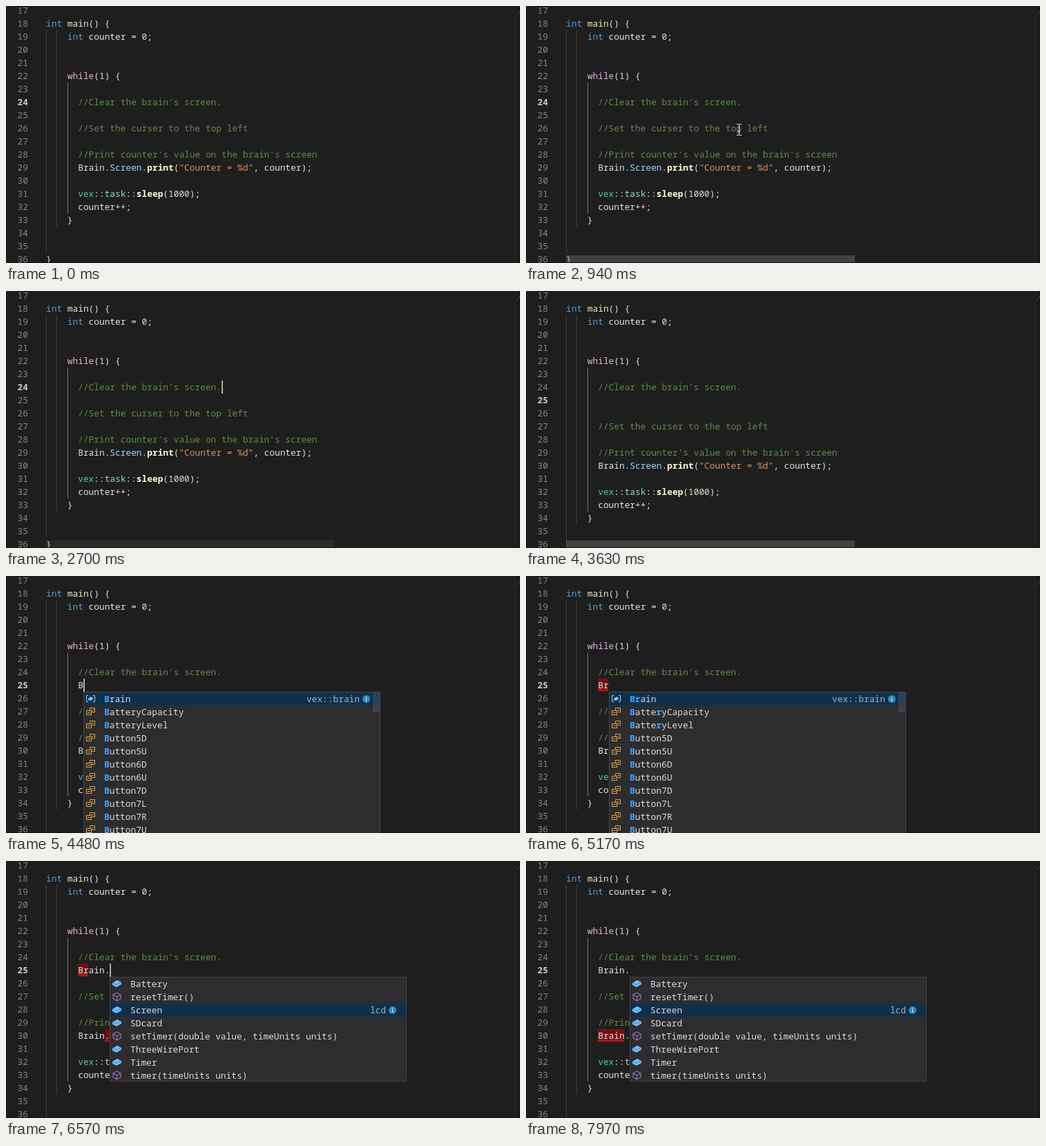
Animation, 744 px wide and 373 px high, one loop 8000 ms. Source, as an HTML page with a canvas:

```html
<!DOCTYPE html>
<html lang="en">
<head>
<meta charset="utf-8">
<title>Code editor</title>
<style>
html, body { margin: 0; width: 100%; height: 100%; overflow: hidden; background: #1e1e1e; }
canvas { display: block; }
</style>
</head>
<body>
<canvas id="stage" width="744" height="373"></canvas>
<script>
const ctx = document.getElementById('stage').getContext('2d');
const LOOP = 8000, CHAR = 7.697, ROW = 19, LEFT = 58;
const FONT = '12.83px "Noto Sans Mono", "DejaVu Sans Mono", monospace';
const PLAIN = '#e4e4e4';

const before = ['', 'int main() {', '    int counter = 0;', '', '', '    while(1) {', '',
  "      //Clear the brain's screen."];
const after = ['', '      //Set the curser to the top left', '',
  "      //Print counter's value on the brain's screen",
  '      Brain.Screen.print("Counter = %d", counter);', '',
  '      vex::task::sleep(1000);', '      counter++;', '    }', '', '', '}'];

const syntax = [
  [/^\/\/.*/, '#608b4e'],
  [/^"[^"]*"/, '#d7936a'],
  [/^int\b/, '#569cd6'],
  [/^while\b/, '#dcb8dc'],
  [/^main\b/, '#ececcc'],
  [/^(print|sleep)\b/, '#ffffdc', true],
  [/^vex\b/, '#4ec9b0'],
  [/^task\b/, '#8fdccb'],
  [/^Screen\b/, '#9cdcfe'],
  [/^\d+/, '#d3e4c8'],
  [/^(\w+|.)/, PLAIN]
];

const globals = ['Brain', 'BatteryCapacity', 'BatteryLevel', 'Button5D', 'Button5U', 'Button6D',
  'Button6U', 'Button7D', 'Button7L', 'Button7R', 'Button7U'];
const members = ['Battery', 'resetTimer()', 'Screen', 'SDcard',
  'setTimer(double value, timeUnits units)', 'ThreeWirePort', 'Timer', 'timer(timeUnits units)'];

// pointer path: [step, x, y], one step is about 77 ms
const path = [[1, 580, 336], [2, 584, 330], [4, 584, 330], [5, 594, 335], [6, 578, 320], [8, 480, 264],
  [10, 365, 205], [12, 308, 179], [13, 305, 170], [15, 324, 142], [18, 324, 132], [21, 324, 132],
  [22, 313, 139], [24, 314, 138], [27, 490, 90], [30, 752, -10]];
const caretOn = [[1710, 2240], [2700, 3630], [4020, 5170], [5640, 6980], [7510, 7970]];
const barAlpha = [[0, 0], [70, .2], [150, .4], [2700, .13], [3160, .4], [4020, .2], [4100, 0]];
const typing = [[0, ''], [4400, 'B'], [4640, 'Br'], [5960, 'Brain'], [6420, 'Brain.']];

const at = (table, t) => table.filter(k => k[0] <= t).pop()[1];
const lineTop = n => 149 + ROW * (n - 25);
const colX = c => LEFT + c * CHAR;

function rect(x, y, w, h, color) {
  ctx.fillStyle = color;
  ctx.fillRect(x, y, w, h);
}

function text(str, x, y, color, bold) {
  ctx.font = (bold ? 'bold ' : '') + FONT;
  ctx.fillStyle = color;
  [...str].forEach((ch, i) => ctx.fillText(ch, x + i * CHAR, y));
}

function poly(points, fill, stroke, close = true) {
  ctx.beginPath();
  points.forEach(([x, y]) => ctx.lineTo(x, y));
  if (close) ctx.closePath();
  if (fill) { ctx.fillStyle = fill; ctx.fill(); }
  if (stroke) { ctx.strokeStyle = stroke; ctx.lineWidth = 1; ctx.stroke(); }
}

function codeLine(str, n) {
  let c = 0;
  while (c < str.length) {
    const rest = str.slice(c);
    const rule = syntax.find(s => s[0].test(rest));
    const word = rest.match(rule[0])[0];
    if (word !== ' ') text(word, colX(c), lineTop(n) + 14, rule[1], rule[2]);
    c += word.length;
  }
}

function guide(x, from, to, color) {
  rect(x, lineTop(from), 1, (to - from + 1) * ROW, color);
}

function errorBox(n, col, len) {
  rect(Math.round(colX(col)), lineTop(n), Math.round(len * CHAR), ROW, '#721010');
}

function squiggle(n, col, len) {
  const wave = [], y = lineTop(n) + 16.5;
  for (let x = 0; x <= len * CHAR; x += 2) wave.push([colX(col) + x, y + (x % 4 ? -1.2 : 1.2)]);
  poly(wave, null, '#f03030', false);
}

function enumIcon(x, y) {
  ctx.strokeStyle = '#e0a040';
  ctx.lineWidth = 1;
  ctx.strokeRect(x + 5.5, y - 5.5, 7, 6);
  rect(x + 1, y - 1, 7, 6, '#2d2d30');
  ctx.strokeRect(x + .5, y - 1.5, 7, 6);
  rect(x + 8, y - 3, 3, 1, '#e0a040');
  rect(x + 2, y + 1, 4, 1, '#e0a040');
}

function variableIcon(x, y) {
  poly([[x + 3, y - 4.5], [x + .5, y - 4.5], [x + .5, y + 4.5], [x + 3, y + 4.5]], null, '#c5c5c5', false);
  poly([[x + 10, y - 4.5], [x + 12.5, y - 4.5], [x + 12.5, y + 4.5], [x + 10, y + 4.5]], null, '#c5c5c5', false);
  poly([[x + 3, y], [x + 7, y - 3], [x + 10, y - 1], [x + 10, y + 1], [x + 6, y + 3], [x + 3, y + 2]], '#75beff');
}

function fieldIcon(x, y) {
  poly([[x, y - 1], [x + 7, y - 5], [x + 13, y - 2], [x + 13, y + 1], [x + 6, y + 5], [x, y + 2]], '#75beff');
  poly([[x + 1, y - 1], [x + 6, y + 1.5], [x + 12, y - 2]], null, '#3d7fb5', false);
}

function methodIcon(x, y) {
  const c = '#b180d7', mid = [x + 6.5, y];
  poly([[x + 6.5, y - 6], [x + 12, y - 3], [x + 12, y + 3], [x + 6.5, y + 6], [x + 1, y + 3], [x + 1, y - 3]], null, c);
  poly([[x + 1, y - 3], mid, [x + 12, y - 3]], null, c, false);
  poly([mid, [x + 6.5, y + 6]], null, c, false);
}

function popup(x, rows, chosen, detail, icon, typed) {
  const y = 168, w = 430, h = rows.length * ROW;
  rect(x, y, w, h, '#2d2d30');
  rect(x + 1, y + 1 + chosen * ROW, w - 2, ROW, '#0f304c');
  rows.forEach((label, i) => {
    const top = y + 1 + i * ROW;
    icon(label, i)(x + 4, top + 9);
    text(label, x + 30, top + 14, '#dcdcdc');
    let from = 0;
    for (const ch of typed) {
      const k = label.indexOf(ch, from);
      if (k < 0) break;
      text(ch, x + 30 + k * CHAR, top + 14, '#3d9bf8', true);
      from = k + 1;
    }
  });
  const mid = y + 10 + chosen * ROW;
  text(detail, x + w - 30 - detail.length * CHAR, mid + 5, '#a9b4bd');
  ctx.fillStyle = '#3487bd';
  ctx.beginPath();
  ctx.arc(x + w - 20.5, mid + .5, 5.5, 0, 7);
  ctx.fill();
  rect(x + w - 21, mid - 3, 1, 1, '#e8f2fa');
  rect(x + w - 21, mid - 1, 1, 5, '#e8f2fa');
  if (typed) rect(x + w - 11, y + 1, 10, 29, 'rgba(121,121,121,.25)');
  ctx.strokeStyle = '#454545';
  ctx.lineWidth = 1;
  ctx.strokeRect(x + .5, y + .5, w - 1, h - 1 + (typed ? 9 : 0));
}

function pointer(t) {
  const s = Math.floor((t + 12) / 77);
  const k = path.findIndex(p => p[0] > s);
  if (k < 1) return;
  const [a, ax, ay] = path[k - 1], [b, bx, by] = path[k];
  const f = (s - a) / (b - a);
  const x = Math.round(ax + (bx - ax) * f), y = Math.round(ay + (by - ay) * f);
  const c = '#f4f4f4';
  rect(x, y - 7, 1, 15, c);
  for (const dy of [-8, 8]) {
    rect(x - 3, y + dy, 3, 1, c);
    rect(x + 1, y + dy, 3, 1, c);
  }
  rect(x - 1, y + 3, 3, 1, c);
}

function draw(t) {
  const split = t >= 3090, typed = at(typing, t), extra = split ? 1 : 0;
  const lines = [...before, ...(split ? ['      ' + typed] : []), ...after];
  const active = 24 + extra;

  rect(0, 0, 744, 373, '#1e1e1e');
  guide(58, 19, 35 + extra, '#404040');
  guide(73, 19, 33 + extra, '#404040');
  guide(89, 23, 32 + extra, '#707070');

  if (t >= 5170 && t < 7050) errorBox(25, 6, 2);
  if (t >= 4640 && t < 7050) errorBox(30, 11, 1);
  if (t >= 7050) errorBox(30, 6, 5);

  for (let n = 17; n <= 36; n++) {
    const on = n === active;
    text(String(n), 16.6, lineTop(n) + 14, on ? '#d0d0d0' : '#858585', on);
    codeLine(lines[n - 17], n);
  }

  if (t >= 5170 && t < 7050) squiggle(25, 6, 2);
  if (t >= 4640 && t < 7050) squiggle(30, 11, 1);
  if (t >= 7050) squiggle(30, 6, 5);

  rect(LEFT, 362, 418, 10, `rgba(121,121,121,${at(barAlpha, t)})`);
  rect(737, 0, 1, 373, '#2b2b2b');
  rect(738, 0, 6, 373, '#1b1b1b');
  rect(740, 11, 1, 2, '#5a5a5a');
  rect(742, 8, 1, 2, '#5a5a5a');
  rect(0, 372, 744, 1, '#141414');

  if (caretOn.some(([a, b]) => t >= a && t < b)) {
    const col = split ? 6 + typed.length : 33;
    rect(Math.round(colX(col)), lineTop(active), 2, ROW, '#aeafad');
  }

  if (t >= 4480 && t < 5960) {
    popup(t < 4640 ? 112 : 120, globals, 0, 'vex::brain', (s, i) => i ? enumIcon : variableIcon, typed);
  }
  if (t >= 6500) {
    popup(150, members, 2, 'lcd', s => s.includes('(') ? methodIcon : fieldIcon, '');
  }
  pointer(t);
}

const start = performance.now();
function tick() {
  draw((performance.now() - start) % LOOP);
  requestAnimationFrame(tick);
}
draw(0);
requestAnimationFrame(tick);
</script>
</body>
</html>
```
